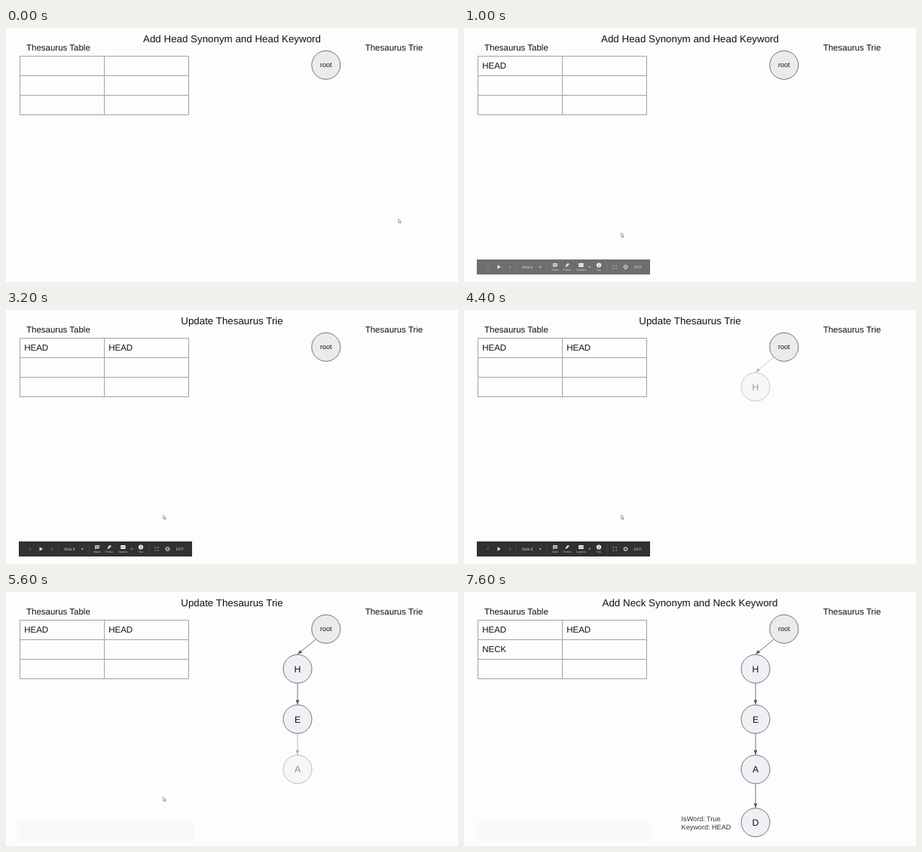
Recreate the animation shown at these times as an HTML page. Size 600 px wide and 338 px high, loop 8 s.

```html
<!DOCTYPE html>
<html lang="en">
<head>
<meta charset="utf-8">
<title>Thesaurus trie</title>
<style>
  html, body { margin: 0; width: 100%; height: 100%; overflow: hidden; background: #fdfdfd; }
  svg { display: block; width: 100vw; height: 100vh; }
  text { font-family: "Liberation Sans", Arial, sans-serif; font-size: 11.5px; fill: #111; text-rendering: geometricPrecision; }
  .mid { text-anchor: middle; }
  #title { font-size: 13.35px; }
  .table { fill: none; stroke: #a3a3a3; }
  .node circle { fill: #eff0f5; stroke: #666; stroke-width: .9; }
  .node text { font-size: 12.2px; }
  .node line { stroke: #666; stroke-width: .9; }
  .node .head { fill: #555; }
  .node .note { font-size: 9.1px; fill: #333; }
  #root circle { fill: #ebebeb; }
  #root text { font-size: 9px; }
  #bar text { font-family: Roboto, sans-serif; font-size: 4.9px; fill: #ccc; }
  #bar .label { font-size: 3.4px; }
  .line { fill: none; stroke: #bbb; stroke-width: .8; }
  .solid { fill: #ddd; }
</style>
</head>
<body>
<svg viewBox="0 0 600 338">
  <text id="title" class="mid" x="300" y="18.8"></text>
  <text x="27" y="30">Thesaurus Table</text>
  <text x="476.7" y="30">Thesaurus Trie</text>
  <path class="table" d="M18.5 37.5H242.5V115.5H18.5ZM18.5 63.5H242.5M18.5 89.5H242.5M130.5 37.5V115.5"/>
  <g id="cells"></g>
  <g id="trie">
    <g class="node" id="root">
      <circle cx="424.8" cy="49.3" r="19"/>
      <text class="mid" x="424.8" y="52.2">root</text>
    </g>
  </g>
  <rect id="shade" x="15" y="305.5" width="234" height="25" rx="3" fill="#f8f9fa"/>
  <g id="bar">
    <rect x="17" y="308" width="230" height="20" fill="#2f3132"/>
    <path class="line" opacity=".6" d="M33 316l-2 2 2 2M60 316l2 2-2 2"/>
    <path class="solid" d="M44.5 315.3l4.4 2.7-4.4 2.7zM99.6 317.4h3.4l-1.7 1.8zM165.4 317.4h2.8l-1.4 1.5z"/>
    <path stroke="#555" stroke-width=".5" d="M69.5 311v14M109.5 311v14M189.5 311v14"/>
    <path class="solid" d="M118.2 313h5.6v4.4h-4.2l-1.4 1.4zM134.4 318.2l.9-2.6 2.6-2.9 2 1.6-2.8 2.8z"/>
    <path stroke="#333" stroke-width=".6" d="M119.2 314.5h3.6M119.2 316h3.6"/>
    <rect x="152.2" y="313" width="6.4" height="5" rx=".6" fill="#f2f2f2"/>
    <path stroke="#333" stroke-width=".8" d="M153.4 315.5h1.6M155.8 315.5h1.6"/>
    <circle cx="179" cy="315.5" r="3.1" fill="#f2f2f2"/>
    <path stroke="#333" stroke-width=".9" d="M179 313.5v.9M179 315v2.3"/>
    <path class="line" d="M198 317v-1.2h1.2M201.2 315.8h1.2v1.2M202.4 319v1.2h-1.2M199.2 320.2h-1.2v-1.2"/>
    <circle class="line" cx="214.5" cy="318" r="1.9" style="stroke-width:1.3"/>
    <circle class="line" cx="214.5" cy="318" r="2.9" stroke-dasharray="1.1 1.18"/>
    <text id="slide" x="77" y="319.8"></text>
    <text x="225.8" y="319.8">EXIT</text>
    <g id="labels"></g>
  </g>
  <path id="cursor" d="M0 0V5.2L1.3 4.2L2.2 6.2L3 5.8L2.2 3.9H3.8Z" fill="#fff" stroke="#666" stroke-width=".6"/>
</svg>
<script>
const LOOP = 8000;
const byId = id => document.getElementById(id);
const fade = (t, start, end) => Math.min(1, Math.max(0, (t - start) / (end - start)));

function add(parent, tag, attrs, content = "") {
  const el = document.createElementNS("http://www.w3.org/2000/svg", tag);
  for (const name in attrs) el.setAttribute(name, attrs[name]);
  el.textContent = content;
  return parent.appendChild(el);
}

// Everything that fades in once: { el, start, end }
const reveals = [];

function addCell(word, x, y, start, end) {
  reveals.push({ el: add(byId("cells"), "text", { x, y }, word), start, end });
}

function addArrow(group, x1, y1, x2, y2) {
  const angle = Math.atan2(y2 - y1, x2 - x1) * 180 / Math.PI;
  add(group, "line", { x1, y1, x2, y2 });
  add(group, "path", {
    class: "head", d: "M0 0L-6 -2.4V2.4Z",
    transform: `translate(${x2} ${y2}) rotate(${angle})`
  });
}

function addNode(letter, y, from, start, end) {
  const el = add(byId("trie"), "g", { class: "node" });
  addArrow(el, ...from, 387, y - 19.5);
  add(el, "circle", { cx: 387, cy: y, r: 19 });
  add(el, "text", { class: "mid", x: 387, y: y + 4.4 }, letter);
  reveals.push({ el, start, end });
  return el;
}

addCell("HEAD", 24.2, 54.3, 400, 900);
addCell("HEAD", 136.2, 54.3, 1850, 2200);
addCell("NECK", 24.2, 80.3, 7050, 7400);

addNode("H", 102.3, [411.3, 63], 4200, 4700);
addNode("E", 169.2, [387, 121.3], 4800, 5300);
addNode("A", 236, [387, 188.2], 5370, 5850);
const last = addNode("D", 306.7, [387, 255], 6550, 7020);
add(last, "text", { class: "note", x: 288.6, y: 304.8 }, "IsWord: True");
add(last, "text", { class: "note", x: 288.6, y: 316.3 }, "Keyword: HEAD");

for (const [label, x] of [["Notes", 121], ["Pointer", 137], ["Captions", 155.4], ["Tips", 179]])
  add(byId("labels"), "text", { class: "mid label", x, y: 323 }, label);

// Time, x, y of the pointer
const pointer = [[0, 521.8, 254], [200, 334, 251], [400, 247, 261], [600, 208.7, 272.8]];

function pointerAt(t) {
  const i = pointer.findIndex(p => p[0] > t);
  if (i < 0) return pointer[pointer.length - 1].slice(1);
  const a = pointer[i - 1], b = pointer[i], k = fade(t, a[0], b[0]);
  return [1, 2].map(n => a[n] + (b[n] - a[n]) * k);
}

function setText(id, value) {
  const el = byId(id);
  if (el.textContent !== value) el.textContent = value;
}

function draw(t) {
  setText("title", t < 3200 ? "Add Head Synonym and Head Keyword"
    : t < 7050 ? "Update Thesaurus Trie" : "Add Neck Synonym and Neck Keyword");
  setText("slide", "Slide " + (t < 1850 ? 6 : t < 3200 ? 7 : 8));
  for (const { el, start, end } of reveals) el.setAttribute("opacity", fade(t, start, end));
  byId("bar").setAttribute("opacity", fade(t, 800, 1090) * (1 - fade(t, 5150, 5400)));
  byId("shade").setAttribute("opacity", t < 5150 ? 0 : 1);
  byId("cursor").setAttribute("transform", `translate(${pointerAt(t)})`);
  byId("cursor").setAttribute("opacity", t < 6200 ? 1 : 0);
}

const began = performance.now();
function tick() {
  draw((performance.now() - began) % LOOP);
  requestAnimationFrame(tick);
}
tick();
</script>
</body>
</html>
```
